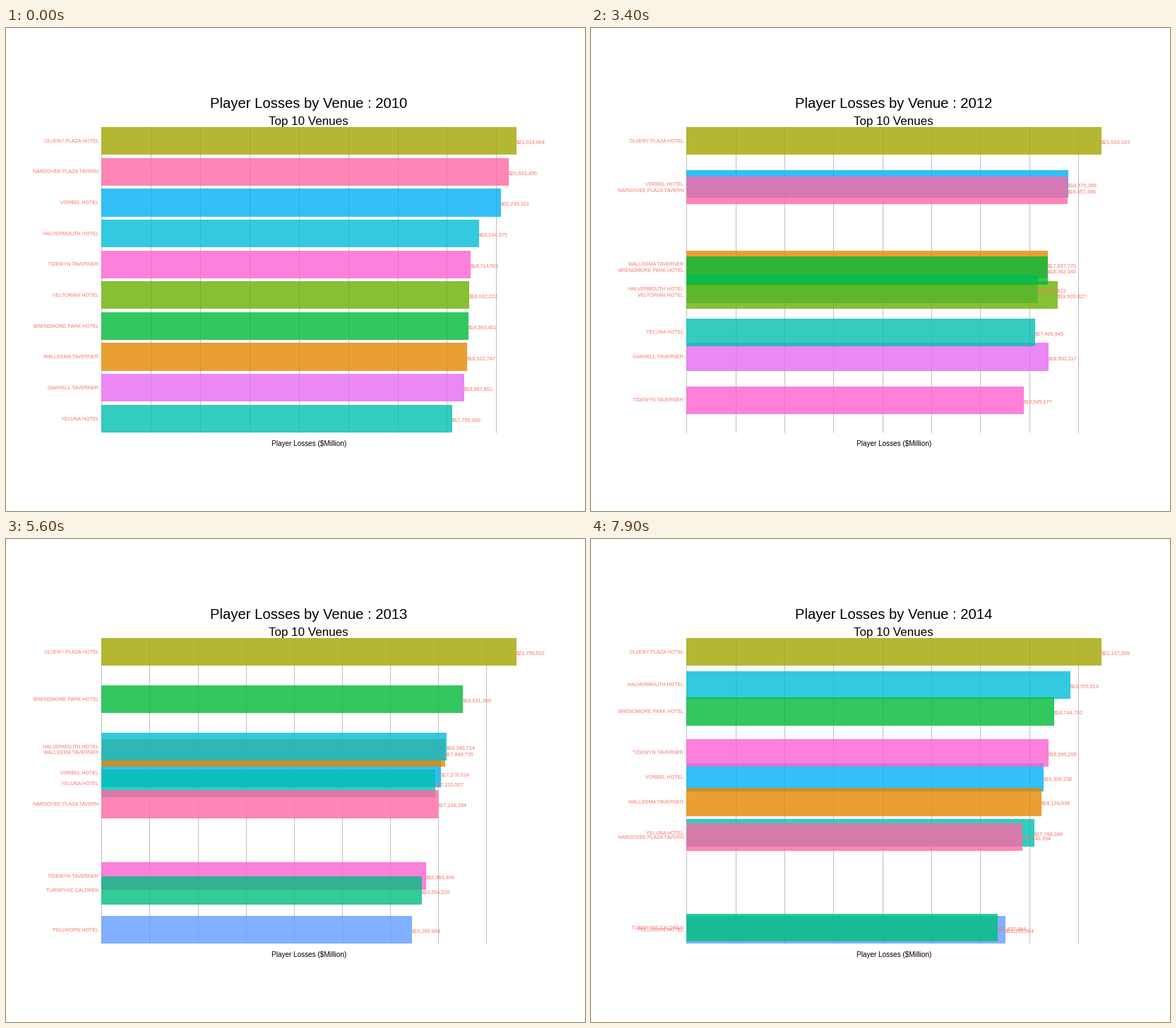
A matplotlib script that plays this animation: 820x683 px, repeating every 8 s.

```python
import matplotlib.pyplot as plt
from matplotlib.animation import FuncAnimation
from matplotlib.patches import Rectangle

W, H, DPI = 820, 683, 100
LEFT, FULL_WIDTH = 135.3, 587.5
TOP, BOTTOM = 140, 572
ROW = (BOTTOM - TOP) / 9.9
GRID_STEP = 2.5e6
SALMON = "#F8766D"

# Listed from the bottom layer to the top one.
VENUES = {
    "V": ("VORBEL HOTEL", "#00B0F6"),
    "P": ("PELLWORN HOTEL", "#619CFF"),
    "K": ("OAKRELL TAVERNER", "#E76BF3"),
    "T": ("TIDEWYN TAVERNER", "#FD61D1"),
    "W": ("WALLEEMA TAVERNER", "#E58700"),
    "H": ("HALVERMOUTH HOTEL", "#00BCD8"),
    "X": ("VELTORIAN HOTEL", "#6BB100"),
    "B": ("BRENDMORE PARK HOTEL", "#00BA38"),
    "Y": ("YELUNA HOTEL", "#00C0AF"),
    "C": ("TURNPYKE CALDREN", "#00BF7D"),
    "N": ("NARDOVEE PLAZA TAVERN", "#FF67A4"),
    "O": ("OLVENY PLAZA HOTEL", "#A3A500"),
}


def ranking(keys, *losses):
    return {key: (rank, loss) for rank, (key, loss) in enumerate(zip(keys, losses))}


FIRST_YEAR = 2010
YEARS = [
    ranking("ONVHTXBWKY", 21019064, 20633456, 20239101, 19144975, 18714501,
            18632222, 18593451, 18522787, 18387801, 17756060),
    ranking("ONVHWXBKYT", 21408494, 21004310, 20844475, 19306118, 19201822,
            18939827, 18564839, 18500117, 18309012, 18238709),
    ranking("OVNBWYHCTP", 21033163, 18570386, 18457486, 18362340, 17937770,
            17466945, 17023022, 16866247, 16545177, 15835643),
    ranking("OBHWYVNTCP", 21750522, 18931309, 18240724, 17846735, 17310507,
            17276614, 17149394, 16983406, 16554520, 16265684),
    # Two newcomers only enter once the move is over.
    ranking("OHBTVWY..C", 21137399, 19705513, 18744702, 18595205, 18308238,
            18124038, 17788349, 0, 0, 15832484),
]
# First and last frame of the move from each year to the next.
MOVES = [(4, 20), (25, 40), (45, 60), (65, 80)]
TITLE_STEP = 9

plt.rcParams["font.family"] = "Liberation Sans"
# The small margin keeps the pixel size from being rounded down.
fig = plt.figure(figsize=((W + 0.01) / DPI, (H + 0.01) / DPI), dpi=DPI,
                 facecolor="white")
ax = fig.add_axes([0, 0, 1, 1])


def mix(a, b, t):
    return a + (b - a) * t


def write(x, baseline, text, px, color="black", ha="center"):
    ax.text(x, baseline, text, fontsize=px * 72 / DPI, color=color,
            ha=ha, va="baseline", zorder=4)


def draw(frame):
    ax.clear()
    ax.set(xlim=(0, W), ylim=(H, 0))
    ax.axis("off")

    index = sum(frame >= end for _, end in MOVES)
    start, end = MOVES[index]
    step = max(0, frame - start)
    t = step / (end - start)
    old, new = YEARS[index], YEARS[index + 1]

    leader = mix(old["O"][1], new["O"][1], t)
    scale = FULL_WIDTH / leader
    for k in range(int(leader // GRID_STEP) + 1):
        x = LEFT + k * GRID_STEP * scale
        ax.plot([x, x], [TOP, BOTTOM], color="#BEBEBE", lw=0.72,
                solid_capstyle="butt", zorder=1)

    for key, (name, color) in VENUES.items():
        if key not in old:
            continue
        before, after = old[key], new.get(key, old[key])
        rank, loss = (mix(a, b, t) for a, b in zip(before, after))
        shown = (after if t >= 0.5 else before)[1]
        y, width = TOP + rank * ROW, loss * scale
        ax.add_patch(Rectangle((LEFT, y), width, 0.9 * ROW, facecolor=color,
                               alpha=0.8, lw=0, zorder=2))
        middle = y + 0.45 * ROW
        write(131.3, middle + 2.2, name, 7, SALMON, "right")
        write(LEFT + width, middle + 3.5, f"${shown:,}", 7.35, SALMON, "left")

    year = FIRST_YEAR + index + (step >= TITLE_STEP)
    write(428.8, 112.5, f"Player Losses by Venue : {year}", 20.3)
    write(428.8, 137.3, "Top 10 Venues", 17)
    write(429.2, 591, r"Player Losses (\$Million)", 10)


anim = FuncAnimation(fig, draw, frames=80, interval=100, repeat=True,
                     repeat_delay=0, init_func=lambda: draw(0))
plt.show()
```
